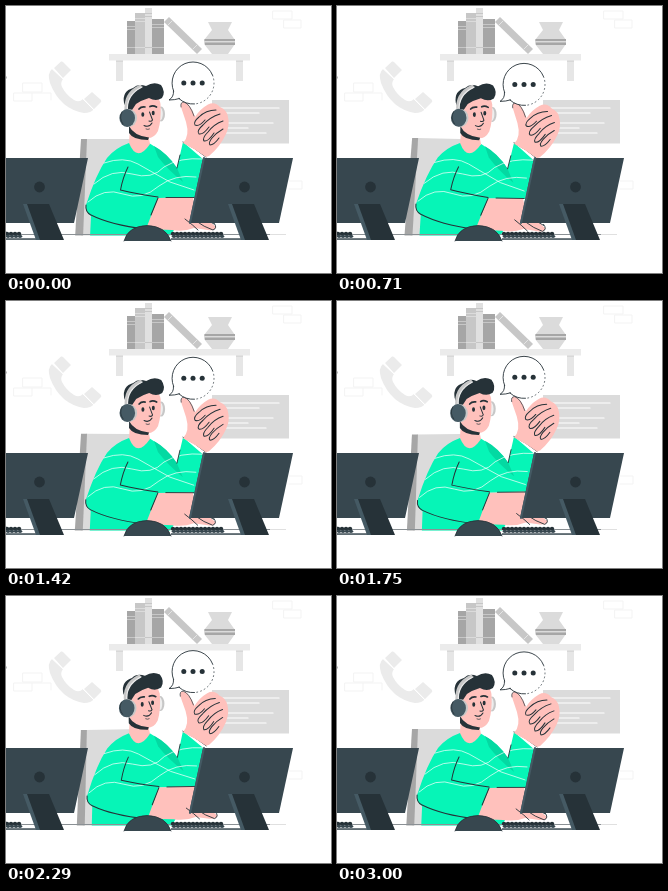
Animation of 325x267 px, one loop 3040 ms. Source, as an HTML page with a canvas:

```html
<!DOCTYPE html>
<html lang="en">
<head>
<meta charset="utf-8">
<title>Support agent</title>
<style>
html, body { margin: 0; width: 100%; height: 100%; overflow: hidden; background: #fff; }
canvas { display: block; width: 325px; height: 267px; }
</style>
</head>
<body>
<canvas id="stage"></canvas>
<script>
const W = 325, H = 267, LOOP = 3040;
const INK = '#263238', SLATE = '#37474f', STEEL = '#455a64';
const SKIN = '#ffc1bc', SHIRT = '#06f5b7', SHADE = '#04d9a2';
const GREY = '#a6a6a6', MID = '#c7c7c7', LIGHT = '#dbdbdb', PALE = '#ebebeb';

const canvas = document.getElementById('stage');
const ctx = canvas.getContext('2d');
const ratio = window.devicePixelRatio || 1;
canvas.width = W * ratio;
canvas.height = H * ratio;

function fill(d, color) {
  ctx.fillStyle = color;
  ctx.fill(new Path2D(d));
}

function line(d, color = INK, width = 1) {
  ctx.strokeStyle = color;
  ctx.lineWidth = width;
  ctx.stroke(new Path2D(d));
}

function rect(x, y, w, h, color) {
  ctx.fillStyle = color;
  ctx.fillRect(x, y, w, h);
}

function oval(x, y, rx, ry, color) {
  ctx.fillStyle = color;
  ctx.beginPath();
  ctx.ellipse(x, y, rx, ry, 0, 0, Math.PI * 2);
  ctx.fill();
}

function bricks() {
  line('M267 5h19v8h-19z M278 14h17v8h-17z M17 77h19v9h-19z M8 87h18v8h-18z M26 87h19v7 M283 175h13v8h-13', '#f3f3f3');
  oval(0, 71.5, .8, 1.2, GREY);
}

function book(x, y, w, color, band) {
  rect(x, y, w, 48 - y, color);
  rect(x, y + 5, w, 1, band);
  rect(x, y + 8, w, 1, band);
  rect(x, 41, w, 1, band);
}

function shelf() {
  rect(110, 54, 7, 21, '#e6e6e6');
  rect(230, 54, 7, 21, '#e6e6e6');
  rect(110, 54, 7, 2, '#d8d8d8');
  rect(230, 54, 7, 2, '#d8d8d8');
  rect(103, 48, 141, 6.5, PALE);

  book(121, 15, 8, GREY, MID);
  book(129, 7, 10, MID, LIGHT);
  book(139, 2, 7, '#e0e0e0', MID);
  book(146, 13, 12, GREY, MID);

  fill('M158 16 L163 11 L196 43 L191 48Z', MID);
  line('M162 19L166 15 M187 43L191 39', '#e6e6e6', 1);

  fill('M202 16H226L222 24L229 34V38L222 48H206L198 38V34L206 24Z', LIGHT);
  rect(198.5, 33, 30.5, 2, GREY);
  rect(199, 36.5, 30, 2.5, GREY);
}

function note() {
  rect(206, 94, 77, 43.5, LIGHT);
  line('M208 102H273 M208 107H253 M208 117H267 M208 122H242 M208 127H260', '#fff', 1.2);
}

function phone() {
  fill('M46 63Q41 67 44 77Q54 103 78 107Q85 107 88 103L77 93Q73 97 68 94Q60 89 56 81Q54 77 57 73Z', PALE);
  fill('M48 62L55 55.5Q57 55 58 57L65 64L57 72Z', PALE);
  fill('M78 93L86 86L95 94Q96 96 94 97L88 103Z', PALE);
  line('M46.5 63L57 73 M77 93L88 104', '#fff', 1);
}

function chair() {
  fill('M80 133H123Q130 134 132 145L138 232H75Z', LIGHT);
  fill('M75 133H81L77 232H69Z', GREY);
}

function torso() {
  fill('M123 137Q109 142 101 152Q90 168 80 199Q79 206 85 210L84 232H163L168 224L152 192H189L198 154L177 136L171 162Q162 148 143 137Z', SHIRT);
  fill('M148 140Q161 147 171 162L177 176Q162 164 152 151Z', SHADE);

  // forearm and hand resting on the desk
  fill('M152 192L187 191Q189 208 204 216L210 221Q209 225 202 224L188 222Q178 226 166 224L140 223L145 210Z', SKIN);
  line('M179 213Q187 219 192 224 M188 207Q201 214 208 218 M190 215Q198 221 207 224Q212 222 208 217', INK, .9);

  fill('M123 137Q131 157 144 138L141 123L124 122Z', SKIN);

  line('M88 178Q106 162 126 168T158 161Q174 151 197 153', '#fff', .7);
  line('M82 196Q98 181 117 188T153 180Q169 168 190 171', '#fff', .7);
  line('M98 157Q118 150 132 158T164 176L188 184', '#fff', .7);

  line('M122 161Q117 171 114.5 184Q131 188 152 191');
  line('M80 199Q79 206 85 209Q105 219 139 223 M152 192L145 209');
  line('M177 136Q188 141 200 151 M171 162L174 149 M160 191.5H188', INK, .9);
}

function hand() {
  fill('M177 137Q184 130 180 116L175 101Q174 96 178 96Q184 97 189 111Q194 103 202 98.5Q209 95 214 101Q221 104 222 111Q224 119 220 128Q214 141 203 150L200 151Q189 143 177 137Z', SKIN);
  line('M175 101Q174 96 178 96Q184 98 188 110', INK, .7);

  // curled fingers
  line('M210 104Q200 104 193 111Q187 116 189 119Q193 121 199 114', INK, 1);
  line('M214 108Q204 111 197 119Q190 125 193 128Q197 129 203 121', INK, 1);
  line('M217 115Q208 118 202 126Q196 132 198 135Q202 136 208 127', INK, 1);
  line('M217 123Q210 127 206 132Q202 137 204 139Q208 139 213 132', INK, 1);
}

function head() {
  oval(155, 108, 4, 7.5, MID);
  oval(154, 108, 2.8, 6.5, '#eee');
  fill('M124 94Q128 87 140 88Q153 88 154.5 98Q155.5 114 152 125Q148 133 140 132Q130 131 124 122Z', SKIN);
  fill('M123 120Q128 130 143 131.5L142 134Q127 134 123 127Z', INK);

  fill('M118 97Q116 85 127 82Q132 77 140 80Q148 75 155 79Q160 86 156 92Q150 96 143 92Q136 94 130 98L126 104L121 104Z', INK);
  line('M120.5 106Q118 88 134 80.5', MID, 3.4);
  line('M121.5 105Q120 89 136 81', PALE, 1.2);

  oval(123, 112, 8, 9, MID);
  oval(121.2, 112, 7.8, 9, STEEL);
  line('M116 106Q112.5 112 117 118', INK, .8);

  oval(136.8, 108.5, 1.5, 2.3, INK);
  oval(147.2, 107, 1.5, 2.3, INK);
  line('M133 103Q135 100.5 139 101 M144 100.5Q147 99 150.5 101', INK, 1.7);
  line('M143.5 106L146.5 114Q145.5 116 143 115', INK, 1);
  line('M138 119.5Q143 122 146 117', INK, 1);
  line('M140 123Q142 124 143.5 123', INK, .7);
}

function arc(from, to) {
  ctx.beginPath();
  ctx.arc(187, 77, 21, from, to);
  ctx.stroke();
}

function bubble() {
  oval(187, 77, 21, 21, '#fff');
  fill('M168 85.5Q168 91 163 94Q169 94 173 92Z', '#fff');
  line('M167.5 85Q168 91 163 94Q169 94 173.5 92.5', INK, .9);
  arc(2.75, 5.9);
  arc(1.5, 2.3);
  // the right rim fades into dashes
  ctx.lineWidth = .7;
  ctx.setLineDash([1, 3]);
  arc(-.38, 1.5);
  ctx.setLineDash([]);
  for (let i = -1; i <= 1; i++) oval(187 + i * 9.2, 77, 2.5, 2.5, INK);
}

function monitor(x) {
  fill(`M${x} 152H${x + 90}L${x + 76} 217H${x - 14}Z`, SLATE);
  line(`M${x + 1} 152L${x - 13} 217`, STEEL, 2);
  oval(x + 41.5, 181, 5.4, 5.4, INK);
  fill(`M${x + 25} 198H${x + 30}L${x + 44} 234H${x + 38}Z`, STEEL);
  fill(`M${x + 29} 198H${x + 51}L${x + 66} 234H${x + 42}Z`, INK);
}

function keyboard(x, count, base) {
  for (let i = 0; i < count; i++) {
    oval(x + i * 4, 227.7, 2.2, 2, INK);
    oval(x + 1 + i * 4, 230.3, 2.2, 1.6, SLATE);
  }
  rect(x - 2, 232.3, base, 1.5, SLATE);
}

function desk() {
  rect(0, 228, 264, 1, '#8a9094');
  rect(264, 228, 16, 1, '#e0e0e0');
  keyboard(1, 4, 34);
  keyboard(167, 13, 72);
  monitor(-8);
  monitor(197);
  fill('M118 235Q122 220 141 219.5Q160 220 165 235Z', SLATE);
  line('M118 235Q122 220 141 219.5Q160 220 165 235', INK, .8);
}

function draw(time) {
  const sway = Math.sin((time % LOOP) / LOOP * Math.PI * 2);
  ctx.setTransform(ratio, 0, 0, ratio, 0, 0);
  ctx.lineCap = ctx.lineJoin = 'round';
  rect(0, 0, W, H, '#fff');

  bricks();
  shelf();
  note();
  phone();

  ctx.save();
  ctx.beginPath();
  ctx.rect(0, 0, W, 229.5);
  ctx.clip();
  ctx.translate(130, 140);
  ctx.rotate(sway * .018);
  ctx.translate(-130, -140);
  chair();
  torso();
  head();
  hand();
  ctx.restore();

  ctx.save();
  ctx.translate(0, sway * 1.4);
  bubble();
  ctx.restore();

  desk();
}

const start = performance.now();
function tick() {
  draw(performance.now() - start);
  requestAnimationFrame(tick);
}
tick();
</script>
</body>
</html>
```
